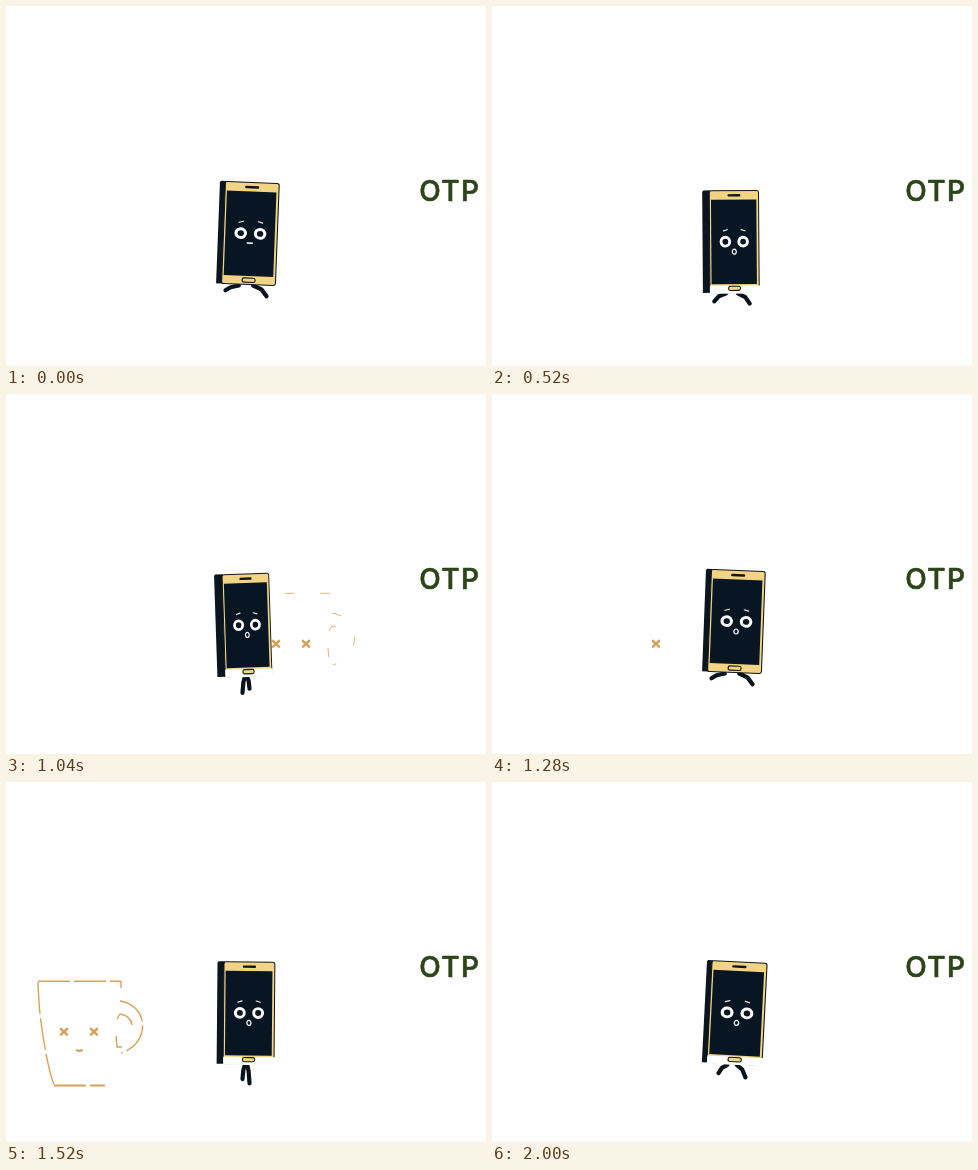
An HTML page for the animation above (2040 ms loop, 480x360 px).

```html
<!DOCTYPE html>
<html lang="en">
<head>
<meta charset="utf-8">
<title>Walking phone</title>
<style>
  html, body { margin: 0; width: 100%; height: 100%; overflow: hidden; background: #fff; }
  svg { display: block; width: 100vw; height: 100vh; }
  .line { fill: none; stroke-linecap: round; stroke-linejoin: round; }
  text { font: 500 28px Inter, "Open Sans", sans-serif; letter-spacing: 1.4px; }
</style>
</head>
<body>
<svg viewBox="0 0 480 360">
  <g id="mug" class="line" stroke="#d6a25a">
    <g id="cup" stroke-linecap="butt">
      <path d="M-26 200Q-25 226-23 240Q-17 284-10 303"/>
      <path d="M-26 199.3H57V206"/>
      <path d="M56 219C86 224 86 262 57 271"/>
      <path d="M53 237L56 232Q67 234 68 243M52 254L53 265H58"/>
      <path id="base" d="M-10 303.5H41" stroke-width="2.2"/>
    </g>
    <path d="M-3 247L3 252.6M3 247L-3 252.6" stroke-width="2.6"/>
    <path id="eye" d="M27 247L33 252.6M33 247L27 252.6" stroke-width="2.6"/>
    <path id="smile" d="M13 268.4Q15.5 269.2 18 268.4" stroke-width="2.2"/>
  </g>
  <text x="443.8" y="195.4" text-anchor="middle" fill="#2d4519" stroke="#2d4519" stroke-width=".7" stroke-linejoin="round">OTP</text>
  <g class="line" stroke="#0a131b" stroke-width="4.2">
    <path id="legA"/><path id="legB"/>
  </g>
  <g id="phone">
    <path id="side" fill="#0a1520"/>
    <g id="front">
      <rect x="-25" y="-51" width="50" height="102" rx="2" fill="#f3d485" stroke="#10161a"/>
      <rect id="gap" x="-25" y="44" width="51" height="8" fill="#fff"/>
      <rect x="-23.3" y="-42" width="46" height="84.5" fill="#081624"/>
      <rect x="-6.5" y="-47.5" width="13" height="2.4" rx="1" fill="#10161a"/>
      <rect x="-6" y="44.6" width="12" height="4.2" rx="1.8" fill="#f3d485" stroke="#10161a" stroke-width="1.1"/>
      <g class="line" stroke="#fff">
        <path d="M-11-10.8L-7-12M7-12L11-10.8" stroke="#f4e9d4" stroke-width="1.2"/>
        <circle cx="-9" cy="0" r="4.4" stroke-width="2.9"/>
        <circle cx="9" cy="0" r="4.4" stroke-width="2.9"/>
        <path id="flat" d="M-2.5 9.6H2" stroke-width="1.6"/>
        <ellipse id="open" cx="0" cy="10" rx="2" ry="2.5" stroke-width="1.2"/>
      </g>
    </g>
  </g>
</svg>
<script>
const LOOP = 2040, STEP = 40, STRIDE = 640;
const { sin, cos, abs, PI } = Math;
const $ = id => document.getElementById(id);
const show = (id, on) => $(id).setAttribute("visibility", on ? "visible" : "hidden");
const clamp = v => Math.min(1, Math.max(0, v));

// dir is -1 for the left leg, 1 for the right
function leg(id, dir, top, spread, drop) {
  const at = (reach, fall) => `${240 + dir * spread * reach} ${top + drop * fall}`;
  $(id).setAttribute("d", `M${at(.35, 0)}L${at(.75, .35)}L${at(1, 1)}`);
}

function drawPhone(t) {
  const phase = t / STRIDE * 2 * PI;
  const sway = cos(phase - PI / 4);
  const x = 243 + 2 * sway;
  const y = 227.5 + 10.5 * abs(sin(phase)) ** 3.2;
  const tilt = .5 + 2.4 * sway;

  const scale = 1 + tilt * .035;
  const edge = -25 * scale, outer = edge - 6.8 + tilt * .6;
  $("phone").setAttribute("transform", `translate(${x} ${y}) rotate(${tilt})`);
  $("front").setAttribute("transform", `scale(${scale} 1)`);
  $("side").setAttribute("d", `M${edge + 1}-51.5H${outer + 1}L${outer}-50V51H${edge + 1}Z`);

  const spread = 8.5 + 13 * cos(phase + PI / 8);
  const drop = 15 - spread * .35, lift = 3 * cos(phase);
  leg("legA", -1, y + 52, spread, drop - lift);
  leg("legB", 1, y + 52, spread, drop + lift);

  show("gap", abs(sin(2 * phase)) > .7);
  show("flat", t < 200);
  show("open", t >= 200);
}

// The outline breaks up as the mug passes behind the phone.
function drawMug(t) {
  const whole = clamp((abs(t - 1200) - 130) / 190);
  $("mug").setAttribute("transform", `translate(${376 - (t - 800) * .4417} 0)`);
  $("cup").setAttribute("stroke-width", .7 + .7 * whole);
  $("cup").setAttribute("stroke-dasharray", `${5 + 27 * whole} ${4 + 26 * (1 - whole)}`);
  const inside = t >= 600;
  $("mug").setAttribute("display", inside ? "inline" : "none");
  show("cup", whole > 0);
  show("eye", whole > 0);
  show("base", whole > .5);
  show("smile", whole > .5);
}

function frame(now) {
  const t = Math.floor((now % LOOP) / STEP) * STEP;
  drawPhone(t);
  drawMug(t);
  requestAnimationFrame(frame);
}
frame(performance.now());
</script>
</body>
</html>
```
